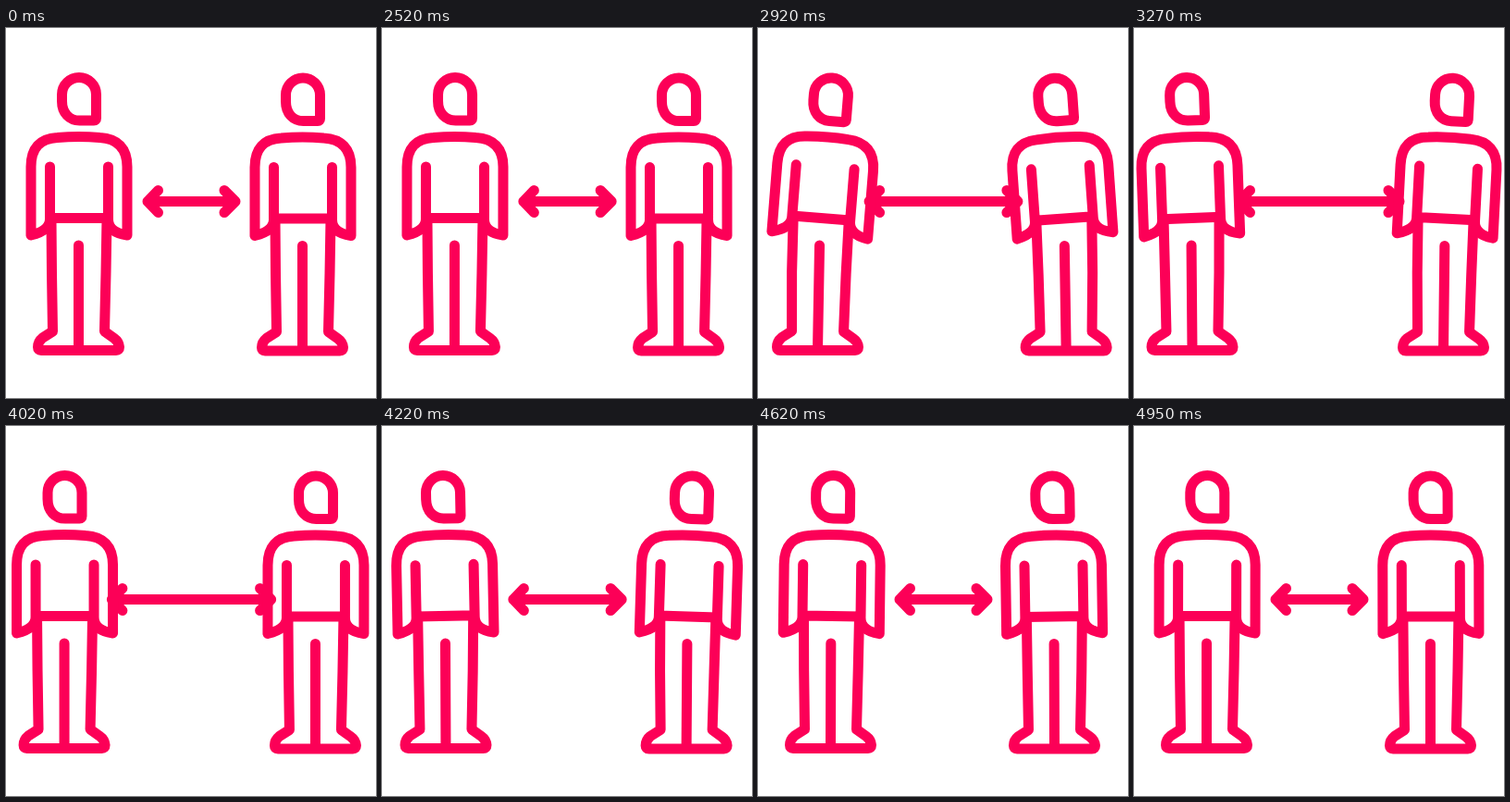
Recreate the animation shown at these times as an HTML page with a canvas. Size 400 by 400 pixels, loop 4.97 s.

```html
<!DOCTYPE html>
<html lang="en">
<head>
<meta charset="utf-8">
<title>Keep your distance</title>
<style>
html, body { margin: 0; width: 100%; height: 100%; overflow: hidden; background: #fff; }
canvas { display: block; width: 400px; height: 400px; }
</style>
</head>
<body>
<canvas id="stage" width="400" height="400"></canvas>
<script>
const ctx = document.getElementById('stage').getContext('2d');
const LOOP = 4970, PART = 2500, MEET = 4000;
const WAIST = 206, FLOOR = 349, ARROW_Y = 187.5;

const clamp = v => Math.min(1, Math.max(0, v));
const ease = v => { v = clamp(v); return v * v * (3 - 2 * v); };

// Eased interpolation through [time, value] keys
function keyed(t, keys) {
  for (let i = 1; i < keys.length; i++) {
    const [t0, v0] = keys[i - 1], [t1, v1] = keys[i];
    if (t < t1) return v0 + (v1 - v0) * ease((t - t0) / (t1 - t0));
  }
  return keys[keys.length - 1][1];
}

// Lean swings one way, overshoots and settles
const swing = (t, a, ta, b, tb) => t <= 0 ? 0 : keyed(t, [[0, 0], [ta, a], [tb, b], [1, 0]]);

// x is measured from the middle of the body
const HEAD = new Path2D('M19 72A18.5 18.5 0 0 0 -18 72V79C-18 92 -10 100 1 100H16.5Q19 100 19 97.5Z');
const TORSO = new Path2D(
  'M-31 150V207Q-31 219 -51.5 224V150C-51.5 130 -42 119.5 -23 118.5Q0 116.5 23 118.5' +
  'C42 119.5 52.5 130 52.5 150V224Q32 221 32 207V150M-31 205.5H32');

// Legs bend with the waist while the feet stay flat
function drawLegs(lean, off) {
  const at = (x, y) => {
    const k = (FLOOR - y) / (FLOOR - WAIST);
    return [x + off * k * k, y + Math.sin(lean) * x * k];
  };
  const move = (...p) => ctx.moveTo(...at(...p));
  const line = (...p) => ctx.lineTo(...at(...p));
  const curve = (a, b, x, y) => ctx.quadraticCurveTo(...at(a, b), ...at(x, y));
  ctx.beginPath();
  move(-29.5, WAIST);
  line(-29, 265);
  line(-28, 328);
  line(-39, 335);
  curve(-44, 339, -44, 345);
  curve(-44, 348.5, -40.5, 348.5);
  line(40.5, 348.5);
  curve(44, 348.5, 44, 345);
  curve(43.5, 339, 38.5, 335.5);
  line(28, 328);
  line(29.5, 265);
  line(30.5, WAIST);
  move(0, 235);
  line(0, 348);
  ctx.stroke();
}

function drawPerson(x, y, degrees) {
  const lean = degrees * Math.PI / 180, off = degrees * 0.7;
  ctx.save();
  ctx.translate(x, y);
  drawLegs(lean, off);
  ctx.translate(off, WAIST);
  ctx.rotate(lean);
  ctx.translate(0, -WAIST);
  ctx.stroke(HEAD);
  ctx.stroke(TORSO);
  ctx.restore();
}

function drawArrow(reach) {
  const left = 153 - reach, right = 248 + reach;
  ctx.beginPath();
  ctx.moveTo(left, ARROW_Y);
  ctx.lineTo(right, ARROW_Y);
  for (const [tip, dx] of [[left, 11.5], [right, -12]]) {
    ctx.moveTo(tip + dx, ARROW_Y - 12);
    ctx.lineTo(tip, ARROW_Y);
    ctx.lineTo(tip + dx, ARROW_Y + 12);
  }
  ctx.stroke();
}

function draw(now) {
  const ms = now % LOOP;
  const out = (ms - PART) / 1000, back = (ms - MEET) / 1000;
  const gap = ease(out / 0.52) - ease(back / 0.52);
  const reach = 39 * (ease(out / 0.56) - ease(back / 0.34));
  const returning = back > 0;
  const leanLeft = returning ? swing(back, -1.6, 0.34, 1.2, 0.72) : swing(out, 4.8, 0.38, -2.1, 0.76);
  const leanRight = returning ? swing(back, 2.5, 0.34, -1.6, 0.72) : swing(out, -4.3, 0.38, 3, 0.76);

  ctx.fillStyle = '#fff';
  ctx.fillRect(0, 0, 400, 400);
  ctx.strokeStyle = '#fc0057';
  ctx.lineWidth = 11;
  ctx.lineCap = ctx.lineJoin = 'round';
  drawArrow(reach);
  drawPerson(78.5 - 15.5 * gap, 0, leanLeft);
  drawPerson(320.5 + 14 * gap, 0.5, leanRight);
}

let start;
function tick(now) {
  if (start === undefined) start = now;
  draw(now - start);
  requestAnimationFrame(tick);
}
draw(0);
requestAnimationFrame(tick);
</script>
</body>
</html>
```
